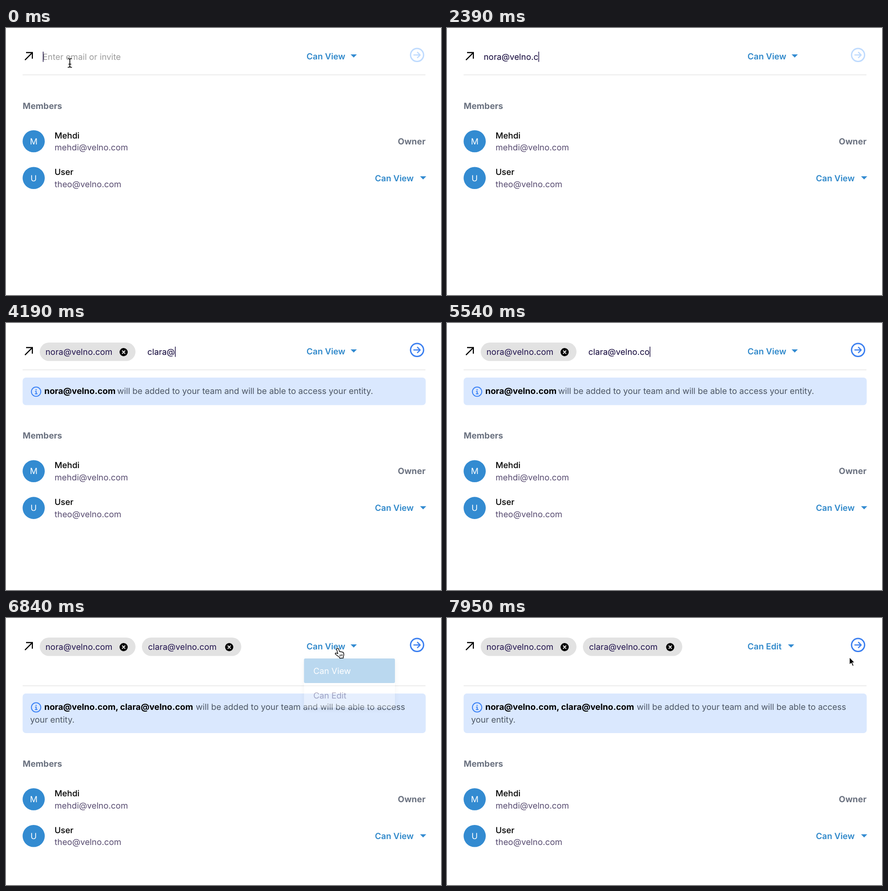
An HTML page that plays this animation: 954x587 px, repeating every 7.99 s.

```html
<!DOCTYPE html>
<html lang="en">
<head>
<meta charset="utf-8">
<title>Invite members</title>
<style>
  html, body { margin: 0; width: 100%; height: 100%; overflow: hidden; background: #fff; }
  svg { display: block; width: 954px; height: 587px; }
  text {
    font: 400 18.4px Inter, "Open Sans", sans-serif;
    font-optical-sizing: none;
    text-rendering: geometricPrecision;
    fill: #4b5563;
  }
  .navy { fill: #20124d; }
  .typed { fill: #0f0338; }
  .hint { fill: #9b9b9b; }
  .bold, .head { font-weight: 700; font-size: 18.7px; }
  .bold { fill: #000; }
  .head { fill: #6b7280; }
  .name { font-weight: 500; fill: #000; }
  .mail { fill: #574b70; }
  .role { font-weight: 600; font-size: 18.6px; fill: #2f88ca; }
  .initial { fill: #fff; text-anchor: middle; }
  .blue { fill: #338bd1; }
  .chip { fill: #e2e2e2; }
  .note { fill: #dae8fe; }
  .icon { fill: none; stroke-linecap: round; stroke-linejoin: round; }
  .hidden { display: none; }
  #menu { filter: drop-shadow(0 4px 6px rgba(0, 0, 0, .16)); }
</style>
</head>
<body>
<svg viewBox="0 0 954 587">
  <defs>
    <path id="drop" class="blue" d="M0 0h13.6l-6.8 7z"/>
    <g id="close">
      <circle r="9"/>
      <path d="M-2.7-2.7 2.7 2.7M2.7-2.7-2.7 2.7" stroke="#fff" stroke-width="2" stroke-linecap="round"/>
    </g>
    <g id="info" class="icon" stroke="#3b82f6" stroke-width="2">
      <circle r="10.3"/>
      <path d="M-1.5-.5H.3V4.5M-1.8 4.7H2.3"/>
      <circle cy="-4.3" r=".5"/>
    </g>
    <path id="ibeam" d="M-4-9.5Q0-9.5 0-7 0-9.5 4-9.5M0-7V7.5M-4 10Q0 10 0 7.5 0 10 4 10M-2.5 3H2.5"/>
  </defs>

  <path fill="none" stroke="#000" stroke-width="2.4" d="M41.6 70.4 57.8 54.2M44 54H57.8V67.5"/>

  <g id="chip1">
    <rect class="chip" x="74" y="43" width="210" height="40.5" rx="20.2"/>
    <text class="navy" x="86.5" y="70">nora@velno.com</text>
    <use href="#close" x="258" y="64"/>
  </g>
  <g id="chip2">
    <rect class="chip" x="298" y="43" width="218" height="40.5" rx="20.2"/>
    <text class="navy" x="311.5" y="70">clara@velno.com</text>
    <use href="#close" x="489.5" y="64"/>
  </g>

  <text id="hint" class="hint" x="80.5" y="70">Enter email or invite</text>
  <text id="input" class="typed" y="70"></text>
  <rect id="caret" width="1.4" height="22.5" fill="#0f0338"/>

  <text id="role" class="role" x="659" y="68.5">Can View</text>
  <use id="roleDrop" href="#drop" y="58"/>

  <g id="send" class="icon" stroke-width="3">
    <circle cx="901.5" cy="59.3" r="14.3"/>
    <path stroke-width="2.5" d="M894.5 59.3H908M902.5 53.5 908.3 59.3 902.5 65.1"/>
  </g>

  <rect id="rule" x="36.5" width="883.5" height="1.4" fill="#e4e4e4"/>

  <g id="note1">
    <rect class="note" x="36.5" y="120" width="884" height="60.5" rx="7"/>
    <use href="#info" x="66" y="151"/>
    <text class="bold" x="84" y="156">nora@velno.com</text>
    <text x="243.7" y="156">will be added to your team and will be able to access your entity.</text>
  </g>
  <g id="note2">
    <rect class="note" x="36.5" y="166" width="884" height="87" rx="7"/>
    <use href="#info" x="66" y="196.5"/>
    <text class="bold" x="84" y="202">nora@velno.com, clara@velno.com</text>
    <text x="416.3" y="202">will be added to your team and will be able to access</text>
    <text x="53" y="230">your entity.</text>
  </g>

  <g id="members">
    <text class="head" x="36.5" y="177.5">Members</text>
    <circle class="blue" cx="60.7" cy="249" r="24.3"/>
    <text class="initial" x="60.7" y="255.7">M</text>
    <text class="name" x="106.5" y="242.5">Mehdi</text>
    <text class="mail" x="106.5" y="269">mehdi@velno.com</text>
    <text class="head" x="920" y="255.7" text-anchor="end">Owner</text>
    <circle class="blue" cx="60.7" cy="329.8" r="24.3"/>
    <text class="initial" x="60.7" y="336.5">U</text>
    <text class="name" x="106.5" y="323.3">User</text>
    <text class="mail" x="106.5" y="349.8">theo@velno.com</text>
    <text class="role" x="809" y="336.5">Can View</text>
    <use href="#drop" x="908" y="326"/>
  </g>

  <g id="menu">
    <rect x="653.5" y="89" width="199.5" height="108" rx="4" fill="#fff"/>
    <rect id="hover" class="blue" x="653.5" width="199.5" height="54" rx="3"/>
    <text id="view" x="674" y="122.5">Can View</text>
    <text id="edit" x="674" y="176.5">Can Edit</text>
  </g>

  <g id="cursor" stroke-linejoin="round">
    <g id="beam" class="icon">
      <use href="#ibeam" stroke="#fff" stroke-width="3.5"/>
      <use href="#ibeam" stroke="#000" stroke-width="1.7"/>
    </g>
    <path id="arrow" stroke="#fff" stroke-width="1.4" d="M0 0V17L4 13.3 7 20 9.8 18.8 6.8 12.2H12Z"/>
    <g id="hand" fill="#fff" stroke="#000" stroke-width="1.4">
      <path d="M-2 1Q-2-2 .8-1.5 2.2-1 2.8 1L4.5 6Q6 5 7 6.5 9 5.5 10 7.2 12.5 6.5 13.5 9 14.5 14 12.5 17.5L12.8 20 5 20.5 4 18Q0 15-4 12-6 9.5-3.5 9-1.5 9 .8 10.5Z"/>
      <path stroke-width="1.1" d="M5 12.5 5.7 16.5M7.6 12 8.2 16M10.1 11.5 10.6 15.5"/>
    </g>
  </g>
</svg>

<script>
const LOOP = 7990;
const CHIP1 = 2740, CHIP2 = 5790, MOVE = 5950, OPEN = 6790, PICK = 7400;

const entries = [
  { text: "nora@velno.com", x: 80.5, until: CHIP1,
    keys: [40, 240, 400, 540, 740, 1340, 1590, 1660, 1740, 2040, 2170, 2290, 2420, 2550] },
  { text: "clara@velno.com", x: 310, until: CHIP2,
    keys: [3090, 3260, 3470, 3700, 3950, 4190, 4440, 4740, 4870, 5000, 5130, 5260, 5390, 5510, 5640] }
];

// time, x, y, upward bow of the stretch leading here
const route = [
  [MOVE, 140, 76.5, 0],
  [6700, 727, 68, 66],
  [6900, 727, 68, 0],
  [7150, 716, 166, 0],
  [PICK, 716, 166, 0],
  [7840, 889, 92, 0],
  [7950, 882.5, 86, 0]
];

const $ = id => document.getElementById(id);
const show = (id, on) => $(id).classList.toggle("hidden", !on);
const set = (id, attrs) => {
  for (const key in attrs) $(id).setAttribute(key, attrs[key]);
};
const clamp = v => Math.max(0, Math.min(1, v));
const ease = p => p * p * (3 - 2 * p);

function cursorAt(t) {
  let from = route[0];
  for (const to of route) {
    if (t < to[0]) {
      if (to === from) break;
      const p = ease((t - from[0]) / (to[0] - from[0]));
      return {
        x: from[1] + (to[1] - from[1]) * p,
        y: from[2] + (to[2] - from[2]) * p - to[3] * 4 * p * (1 - p)
      };
    }
    from = to;
  }
  return { x: from[1], y: from[2] };
}

function drawInput(t) {
  const entry = entries.find(e => t < e.until);
  const typed = entry ? entry.text.slice(0, entry.keys.filter(k => k <= t).length) : "";
  const x = entry ? entry.x : 80.5;
  $("input").textContent = typed;
  set("input", { x });
  set("caret", {
    x: x + (typed ? $("input").getComputedTextLength() : 0) + 0.3,
    y: entry ? 52 : 107
  });
  show("caret", t < OPEN);
  show("hint", t < entries[0].keys[0]);
}

function drawLayout(t) {
  const one = t >= CHIP1, two = t >= CHIP2;
  show("chip1", one);
  show("chip2", two);
  show("note1", one && !two);
  show("note2", two);
  set("send", { stroke: one ? "#3b7ff0" : "#bfdbfe" });
  set("rule", { y: two ? 148.3 : 102.3 });
  set("members", { transform: `translate(0 ${two ? 149.5 : one ? 76.8 : 0})` });
  $("role").textContent = t < PICK ? "Can View" : "Can Edit";
  set("roleDrop", { x: t < PICK ? 755.8 : 747.8 });
}

function drawMenu(t, pos) {
  const alpha = clamp((t - OPEN) / 150) * clamp((PICK + 150 - t) / 150);
  const onEdit = t >= PICK || pos.y > 143;
  show("menu", alpha > 0);
  set("menu", { opacity: alpha });
  set("hover", { y: onEdit ? 143 : 89 });
  $("view").style.fill = onEdit ? "#20124d" : "#fff";
  $("edit").style.fill = onEdit ? "#fff" : "#20124d";
}

function drawCursor(t, pos) {
  const onRole = pos.x > 655 && pos.x < 775 && pos.y > 46 && pos.y < 89;
  const onMenu = t > OPEN && t < PICK + 80;
  const hand = onRole || onMenu;
  const beam = !hand && pos.x < 640 && pos.y > 42;
  show("cursor", t < entries[0].keys[0] || t >= MOVE);
  show("hand", hand);
  show("beam", beam);
  show("arrow", !hand && !beam);
  set("cursor", { transform: `translate(${pos.x} ${pos.y})` });
}

let start;
function frame(now) {
  start ??= now;
  const t = (now - start) % LOOP;
  const pos = cursorAt(t);
  drawInput(t);
  drawLayout(t);
  drawMenu(t, pos);
  drawCursor(t, pos);
  requestAnimationFrame(frame);
}
requestAnimationFrame(frame);
</script>
</body>
</html>
```
